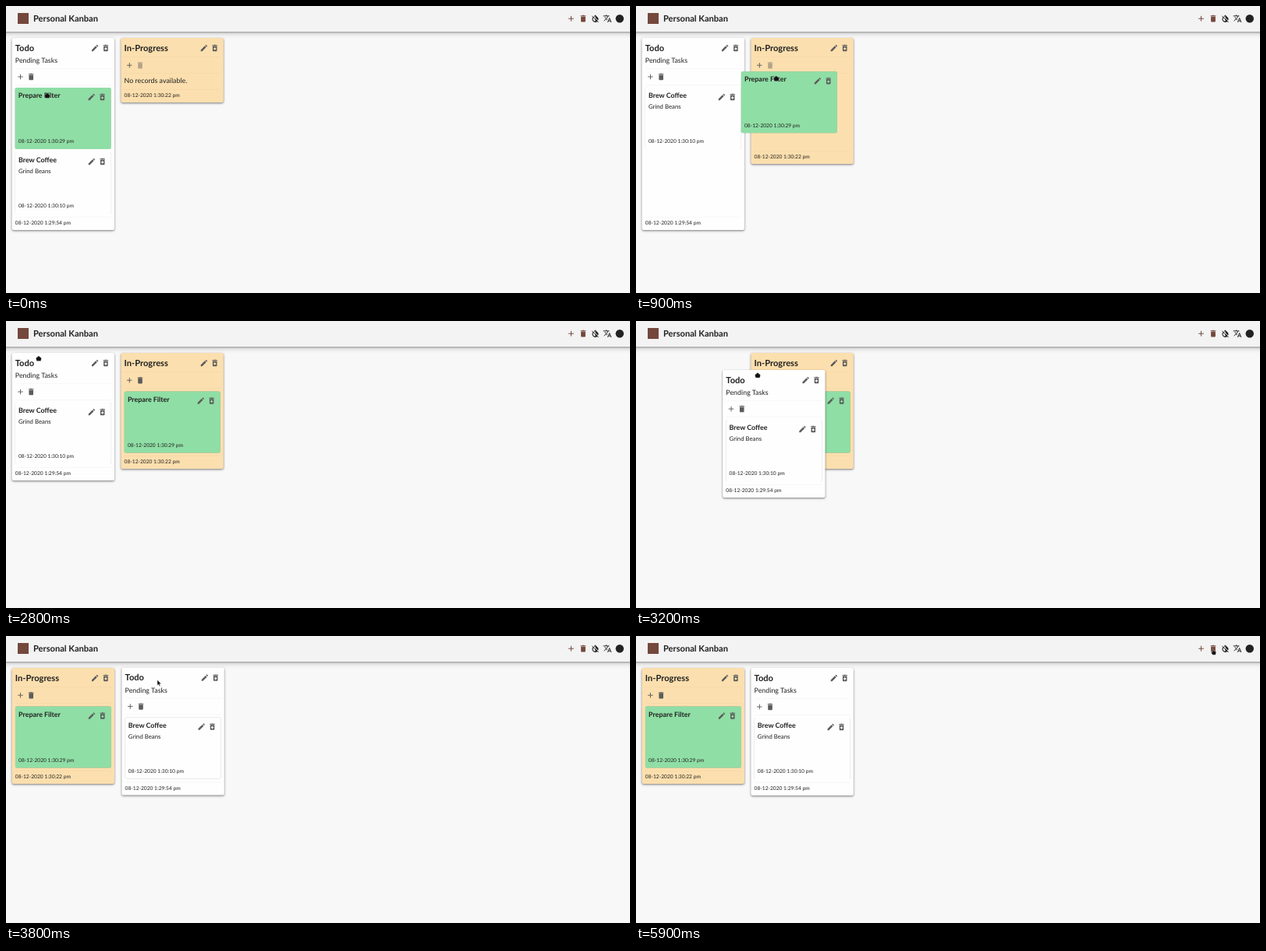
Animation of 800 by 369 pixels, one loop 6 s. Source, as an HTML page:

```html
<!DOCTYPE html>
<html lang="en">
<head>
<meta charset="utf-8">
<title>Personal Kanban</title>
<style>
  html, body { margin: 0; width: 100%; height: 100%; overflow: hidden; background: #f8f8f8; }
  svg { display: block; width: 100%; height: 100%; }
  text { font-family: Lato, "Open Sans", sans-serif; fill: #202020; text-rendering: geometricPrecision; }
  .h1 { font-size: 11.11px; font-weight: 700; }
  .h2 { font-size: 8.89px; font-weight: 700; }
  .body { font-size: 8.89px; }
  .note { font-size: 7.78px; }
  .date { font-size: 6.67px; }
  .icon { color: #5c5c5c; }
  .brown { color: #74483c; }
  .dark { color: #222; }
  .icon, .brown, .dark { fill: currentColor; }
  .stroke { fill: none; stroke: currentColor; stroke-width: 2; }
  .line { fill: #000; opacity: .05; }
  .bar { fill: #f3f3f3; filter: drop-shadow(0 1px 1.2px rgba(0,0,0,.3)) drop-shadow(0 2px 3px rgba(0,0,0,.2)); }
  .column { filter: drop-shadow(0 1.1px .8px rgba(0,0,0,.34)) drop-shadow(0 1px 1.6px rgba(0,0,0,.2)); }
  .card { filter: drop-shadow(0 .9px .5px rgba(0,0,0,.3)); }
  #cursor path { fill: #111; stroke: #fff; stroke-width: .3; }
</style>
</head>
<body>
<svg viewBox="0 0 800 369">
  <defs>
    <symbol id="add" viewBox="0 0 24 24"><path class="stroke" d="M12 5v14M5 12h14"/></symbol>
    <symbol id="bin" viewBox="0 0 24 24"><path d="M5 4h4l1-1h4l1 1h4v2H5zM6 7h12v12q0 2-2 2H8q-2 0-2-2z"/></symbol>
    <symbol id="drop" viewBox="0 0 24 24"><path fill-rule="evenodd" d="M5 4h4l1-1h4l1 1h4v2H5zM6 7h12v12q0 2-2 2H8q-2 0-2-2zM12 10l4 4-4 4-4-4z"/></symbol>
    <symbol id="edit" viewBox="0 0 24 24"><path d="M3 17.2L14 6.2l3.8 3.8-11 11H3zM15.2 5l2.3-2.3 3.8 3.8L19 8.8z"/></symbol>
    <symbol id="invert" viewBox="0 0 24 24">
      <path fill-rule="evenodd" d="M12 2.3l5.7 5.6a8 8 0 1 1-11.4 0zM12 5v14.6a6 6 0 0 1-4.3-10.3z"/>
      <path stroke="#f3f3f3" stroke-width="2" d="M5 3.5l17 17"/>
      <path class="stroke" d="M3.5 5l17 17"/>
    </symbol>
    <symbol id="language" viewBox="0 0 24 24"><path class="stroke" d="M1 5h16M9 2v3M14 5Q12 12 3 18M5.5 8Q8 13 12 16M13 22l4.5-11.5L22 22M14.5 18h6"/></symbol>
  </defs>
  <rect class="bar" x="-10" y="-10" width="820" height="43"/>
  <rect class="brown" x="15" y="9" width="14" height="14"/>
  <text class="h1" x="35" y="20">Personal Kanban</text>
  <g id="tools"><circle class="dark" cx="786.8" cy="16.2" r="5.2"/></g>
  <g id="board"></g>
  <g id="cursor">
    <path id="arrow" d="M0 0v7l1.6-1.5 1.1 2.4 1.1-.5-1.1-2.3h2.2z"/>
    <path id="fist" d="M-2.6 3.4l-1-3q0-2 2-2.2q1.5-2.6 3 0q2 .2 2 2.2l-.8 3z"/>
    <path id="hand" d="M-1.5-3q.6-1 1.2 0v2l3.6 1.2-.7 4h-3.8l-2.2-3.2 1.9-.4z"/>
  </g>
</svg>
<script>
const LOOP = 6000, STEP = 100;
const LEFT = 7.6, PITCH = 139.8, TOP = 41, INSET = 4.2;
const CARD_W = 123, CARD_H = 79, GAP = 4;
const $ = id => document.getElementById(id);

function add(parent, tag, attrs = {}, text = '') {
  const el = document.createElementNS('http://www.w3.org/2000/svg', tag);
  for (const k in attrs) el.setAttribute(k, attrs[k]);
  el.textContent = text;
  parent.append(el);
  return el;
}
const label = (g, cls, x, y, s) => add(g, 'text', { class: cls, x, y }, s);
const icon = (g, name, x, y, cls = 'icon', size = 11.2) =>
  add(g, 'use', { href: '#' + name, class: cls, x: x - size / 2, y: y - size / 2, width: size, height: size });
const line = (g, y) => add(g, 'rect', { class: 'line', x: INSET, y, width: CARD_W, height: .6 });
const move = (el, x, y) => el.setAttribute('transform', `translate(${x} ${y})`);
const show = (el, on) => el.setAttribute('visibility', on ? 'visible' : 'hidden');

// Edit and delete buttons, right-aligned in a panel.
function actions(g, width, y) {
  icon(g, 'edit', width - 24.9, y);
  icon(g, 'drop', width - 11.1, y);
}

function makeCard(parent, title, note, date, fill) {
  const g = add(parent, 'g');
  add(g, 'rect', { class: 'card', width: CARD_W, height: CARD_H, rx: 2, fill });
  label(g, 'h2', INSET, 13, title);
  label(g, 'note', INSET, 27, note);
  label(g, 'date', INSET, 71.4, date);
  actions(g, CARD_W, 12);
  return g;
}

function makeColumn(title, note, date, fill) {
  const g = add($('board'), 'g'), width = CARD_W + 2 * INSET, top = note ? 50 : 35.2;
  const panel = add(g, 'rect', { class: 'column', width, rx: 2.2, fill });
  label(g, 'h1', INSET, 16.6, title);
  label(g, 'body', INSET, 32.3, note);
  actions(g, width, 13);
  line(g, top - 11);
  icon(g, 'add', 10.9, top);
  const bin = icon(g, 'bin', 24.6, top);
  line(g, top + 10);
  const foot = add(g, 'g');
  line(foot, -17);
  label(foot, 'date', INSET, -7, date);
  const resize = h => { panel.setAttribute('height', h); move(foot, 0, h); };
  return { g, bin, resize };
}

['add', 'bin', 'invert', 'language'].forEach((name, i) =>
  icon($('tools'), name, 724.5 + i * 15.5, 16.2, i < 2 ? 'brown' : 'dark', 11.6));

const todo = makeColumn('Todo', 'Pending Tasks', '08-12-2020 1:29:54 pm', '#fefefe');
const doing = makeColumn('In-Progress', '', '08-12-2020 1:30:22 pm', '#fcdfae');
const empty = label(doing.g, 'body', INSET, 58.4, 'No records available.');
const brew = makeCard(todo.g, 'Brew Coffee', 'Grind Beans', '08-12-2020 1:30:10 pm', '#fefefe');
const filter = makeCard($('board'), 'Prepare Filter', '', '08-12-2020 1:30:29 pm', '#8fdea5');

const smooth = p => p * p * (3 - 2 * p);
const snap = p => 1 - (1 - p) ** 4;
const ramp = (t, from, to, ease = smooth) => ease(Math.min(1, Math.max(0, (t - from) / (to - from))));

// Places where the pointer pauses: time, x, y.
const stops = [
  [0, 53, 115], [900, 180, 93], [1500, 135.5, 266], [2800, 42, 48],
  [3400, 196, 63.5], [3800, 194, 56.5], [5500, 740.5, 20]
];

function pointer(t) {
  const i = stops.findIndex(s => s[0] > t);
  if (i < 0) return stops[stops.length - 1].slice(1);
  const [t0, x0, y0] = stops[i - 1], [t1, x1, y1] = stops[i], p = ramp(t, t0, t1);
  return [x0 + (x1 - x0) * p, y0 + (y1 - y0) * p];
}

function pose(t) {
  if (t < 1000 || (t >= 2700 && t < 3600)) return 'fist';
  return t >= 5400 ? 'hand' : 'arrow';
}

function draw(t) {
  const dropped = t >= 1300, second = t >= 2000;

  // The green card goes to the second column and the lists make room.
  const carry = ramp(t, 0, 900), land = ramp(t, 1000, 1200), room = ramp(t, 500, 700, snap);
  const swap = ramp(t, 3200, 3500, snap), doingX = LEFT + PITCH * (1 - swap);
  move(filter, LEFT + GAP + 123.2 * carry + 16.9 * land - PITCH * swap, 105 - 20.7 * carry + 6.2 * land);
  move(brew, INSET, 64 + (CARD_H + GAP) * (1 - room));
  move(doing.g, doingX, TOP);
  doing.resize(83 + CARD_H * room - (dropped ? 13 : 0));
  todo.resize(164 + (CARD_H + GAP) * (1 - ramp(t, 1600, 1900)));
  show(empty, !dropped);
  doing.bin.setAttribute('opacity', dropped ? 1 : .45);

  // The Todo column trades places, dipping on the way and overshooting a little.
  const drag = ramp(t, 2800, 3400), settle = ramp(t, 3400, 3800), rest = t >= 3900;
  const dip = 14 * Math.sin(Math.PI * drag), over = rest ? 0 : settle;
  move(todo.g, LEFT + PITCH * drag + over, TOP + 16 * drag * (1 - settle) + dip - .4 * over);

  const [x, y] = pointer(t);
  move($('cursor'), x, y + dip);
  for (const id of ['arrow', 'fist', 'hand']) show($(id), id === pose(t));

  // Whatever is being dragged lies on top.
  const top = second ? todo.g : filter;
  if ($('board').lastChild !== top)
    $('board').append(...(second ? [doing.g, filter, top] : [todo.g, doing.g, top]));
}

function tick() {
  draw(Math.floor(performance.now() % LOOP / STEP) * STEP);
  requestAnimationFrame(tick);
}
tick();
</script>
</body>
</html>
```
